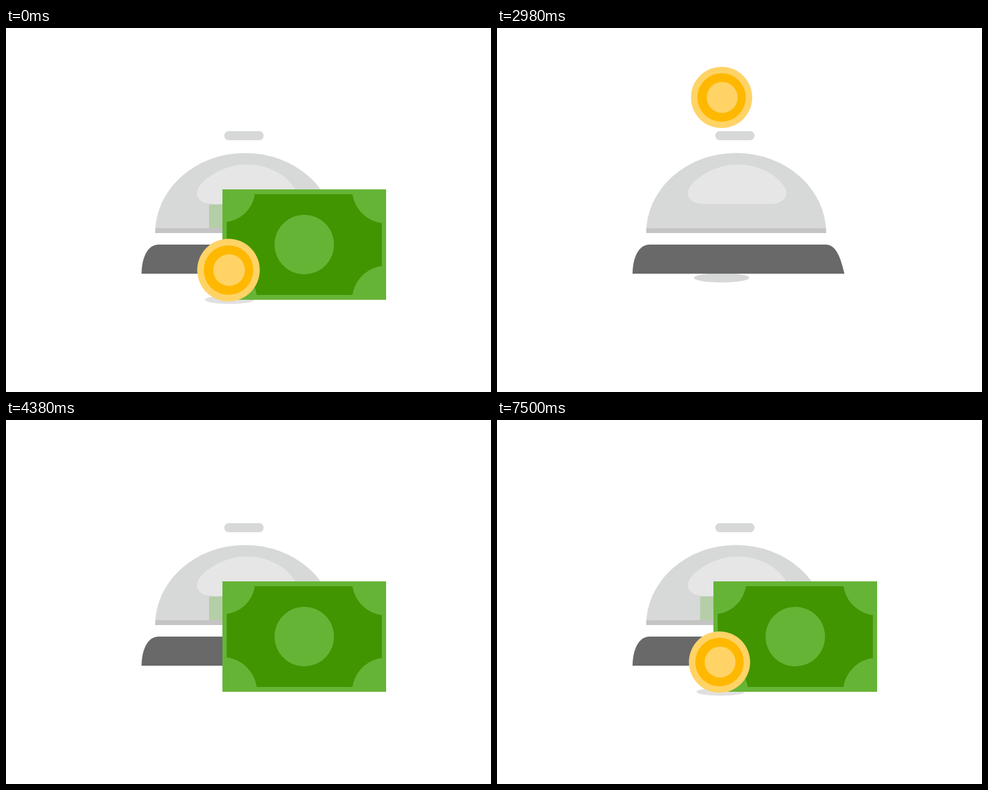
These frames come from a looping animation (800 px wide and 600 px high, 8.3 s). An HTML page:

```html
<!DOCTYPE html>
<html lang="en">
<head>
<meta charset="utf-8">
<title>Service bell</title>
<style>
  html, body { margin: 0; width: 100%; height: 100%; overflow: hidden; background: #fff; }
  svg { display: block; width: 100%; height: 100%; }
</style>
</head>
<body>
<svg viewBox="0 0 800 600">
  <defs>
    <clipPath id="domeShape"><path d="M246 338A148.5 132 0 0 1 543 338Z"/></clipPath>
    <clipPath id="billShape"><rect x="-135" y="-91" width="270" height="182"/></clipPath>
  </defs>

  <ellipse id="shadow"/>
  <path d="M223.500 405C224 379 233 357 252 357H542C560 357 567 380 573 405Z" fill="#696969"/>

  <rect id="button" x="360" y="170" width="65" height="15" rx="7.500" fill="#d7d9d8"/>
  <g id="dome">
    <g clip-path="url(#domeShape)">
      <rect x="246" y="206" width="297" height="132" fill="#d7d9d8"/>
      <path d="M342 290C315 290 308 272 322 257C340 238 368 225 397 225C432 225 462 242 475 263C482 277 472 290 450 290Z" fill="#e6e6e6"/>
      <rect id="reflection" width="180" height="40" fill="#66b436" opacity="0"/>
      <rect x="246" y="330" width="297" height="8" fill="#c4c4c4"/>
      <ellipse id="domeShadow" ry="29" fill="#c4c5c4"/>
    </g>
  </g>

  <g id="bill" clip-path="url(#billShape)">
    <rect x="-135" y="-91" width="270" height="182" fill="#66b436"/>
    <rect x="-128" y="-83" width="256" height="166" fill="#419500"/>
    <g fill="#66b436">
      <circle cx="-135" cy="-91" r="54"/>
      <circle cx="135" cy="-91" r="56"/>
      <circle cx="-135" cy="91" r="57"/>
      <circle cx="135" cy="91" r="56"/>
      <circle r="49"/>
    </g>
  </g>

  <g id="coin">
    <circle r="50.500" fill="#ffd366"/>
    <circle r="40" fill="#ffb800"/>
    <circle cx="1" r="25.500" fill="#ffd366"/>
  </g>
</svg>
<script>
const LOOP = 8300, IMPACT = 3014, RELEASE = 3080, GROUND = 343;
const el = id => document.getElementById(id);
const [shadow, button, dome, reflection, domeShadow, bill, coin] =
  ['shadow', 'button', 'dome', 'reflection', 'domeShadow', 'bill', 'coin'].map(el);

const progress = (t, from, to) => Math.min(1, Math.max(0, (t - from) / (to - from)));
const mix = (a, b, k) => a + (b - a) * k;
const smooth = k => k * k * (3 - 2 * k);
const set = (node, attrs) => {
  for (const name in attrs) node.setAttribute(name, attrs[name]);
};
const place = (node, x, y, scale = 1) => {
  set(node, {
    transform: `translate(${x} ${y}) scale(${scale})`,
    visibility: scale > 0 ? 'visible' : 'hidden'
  });
};

// Swell a little, then collapse.
const collapse = (t, start, peak, end) =>
  (1 + .2 * smooth(progress(t, start, peak))) * (1 - progress(t, peak, end) ** 2);

function bellOffset(t) {
  const u = t - IMPACT;
  if (u < 0 || u > 1366) return 0;
  return 23.7 * Math.exp(-u / 1400) * (1 - u / 1370) * Math.sin(Math.PI * u / 260);
}

function coinState(t) {
  if (t < 800) return { x: 367, y: 399, scale: collapse(t, -40, 160, 480) };
  if (t >= 2340 && t < 4200) {
    if (t < IMPACT) {
      return { x: mix(-48.5, 392, progress(t, 2340, IMPACT)),
               y: 55.5 + .000865 * (t - 2720) ** 2, scale: 1, flying: true };
    }
    const u = Math.max(0, t - RELEASE);
    const y = t < RELEASE
      ? mix(130, 182, progress(t, IMPACT, RELEASE) / 2)
      : Math.min(GROUND, 137 + .000865 * (t - 3307) ** 2);
    return { x: 392 + .612 * u - .000138 * u * u, y, scale: 1, flying: true };
  }
  if (t >= 5340) {
    const u = Math.min(1740, t - 5340);
    const x = 367 - .0995 * (1740 - u) - 246 * (1 - progress(u, 0, 500)) ** 2;
    return { x, y: mix(398, 399, progress(x, 251, 367)), scale: 1 };
  }
  return { x: 0, y: 0, scale: 0 };
}

function billState(t) {
  if (t < 2000) {
    return { x: mix(492, 389, smooth(progress(t, 40, 320))), y: 357,
             scale: collapse(t, 40, 320, 800) };
  }
  const out = 1 - (1 - progress(t, 3180, 4100)) ** 2;
  const drop = Math.sin(progress(t, 3180, 3480) * Math.PI / 2);
  return {
    x: mix(396, 492, out),
    y: mix(mix(347, 460, drop), 357, smooth(progress(t, 3480, 4000))),
    scale: smooth(progress(t, 3160, 3400))
  };
}

function drawShadow(t, c) {
  if (!c.scale) return set(shadow, { rx: 0, ry: 0 });
  if (c.flying) {
    const k = progress(t, 2340, 3420);
    set(shadow, { cx: c.x, cy: mix(439, 393, k), rx: mix(60, 36, k),
                  ry: mix(6.5, 8.5, k), fill: k < .5 ? '#dfdfdf' : '#d7d9d8' });
  } else {
    set(shadow, { cx: c.x + 2 - (367 - c.x) * .06, cy: 448, rx: 40 * c.scale,
                  ry: 6.5 * c.scale, fill: '#e0e0e0' });
  }
}

function draw(t) {
  const c = coinState(t), b = billState(t), lift = bellOffset(t);

  place(coin, c.x, c.y, c.scale);
  place(bill, b.x, b.y, b.scale);
  place(button, 0, lift * .75);
  place(dome, 0, lift);
  drawShadow(t, c);

  const tint = t < 800 ? 1 - progress(t, 40, 400) : progress(t, 3900, 4300);
  set(reflection, { x: 335, y: b.y - 66, opacity: .3 * tint });

  // The coin's shade slides over the dome and narrows toward its edge.
  const slide = c.flying ? (c.x - 392) / 192 : 0;
  set(domeShadow, {
    rx: mix(20, 10, Math.min(1, slide)),
    opacity: progress(slide, .3, .8),
    transform: `translate(${mix(392, 521, slide)} ${mix(245, 289, slide)}) rotate(${-25 * slide})`
  });
}

const start = performance.now();
function tick() {
  draw((performance.now() - start) % LOOP);
  requestAnimationFrame(tick);
}
tick();
</script>
</body>
</html>
```
